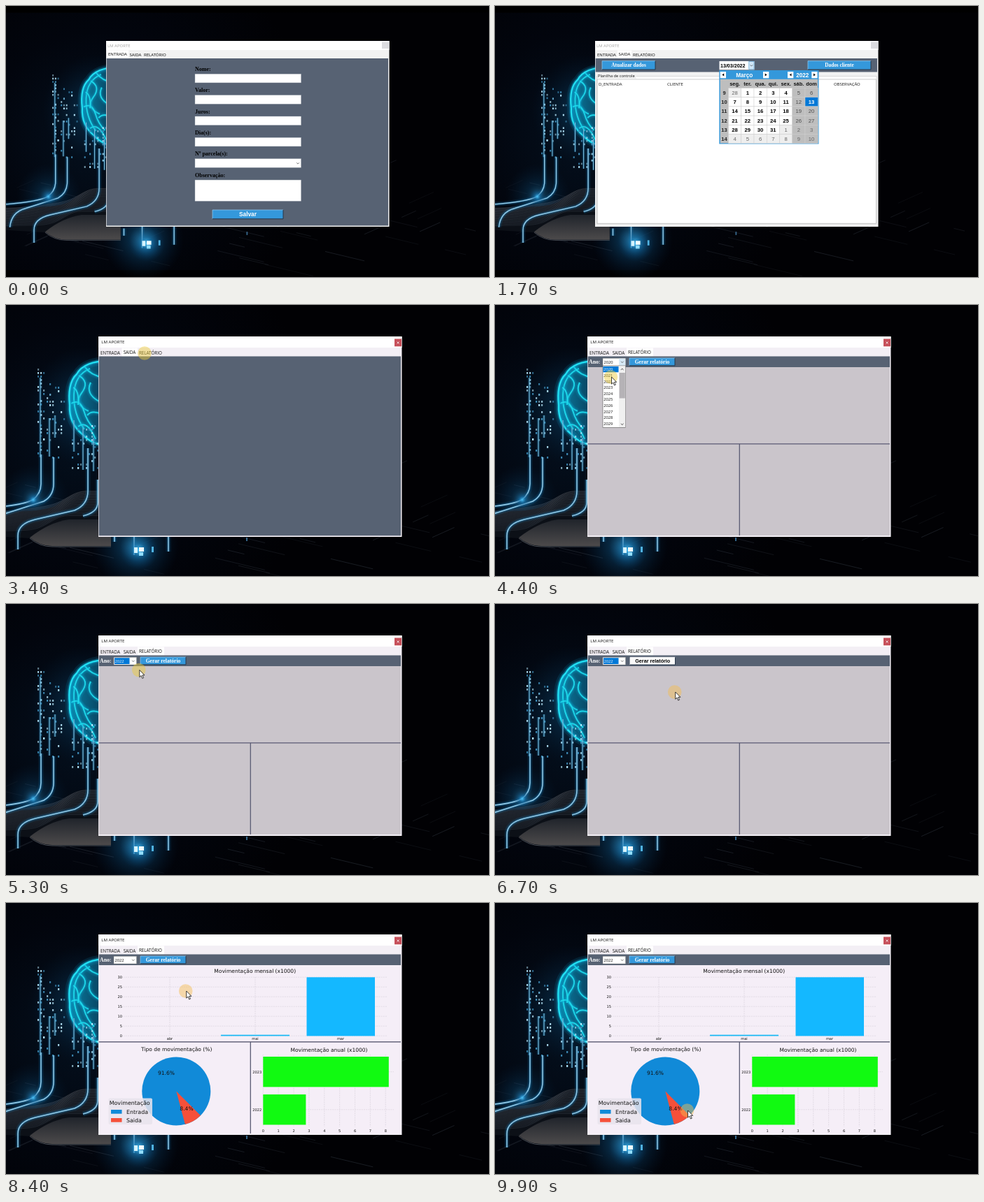
These frames come from a looping animation (690 by 388 pixels, 10000 ms). An HTML page:

```html
<!DOCTYPE html>
<html lang="pt">
<head>
<meta charset="utf-8">
<title>Controle financeiro</title>
<style>
html, body { margin: 0; width: 100%; height: 100%; overflow: hidden; background: #000; }
svg { display: block; width: 100vw; height: 100vh; }
text { white-space: pre; }
.ui { font-family: "Open Sans", "Noto Sans", sans-serif; }
.serif { font-family: "Liberation Serif", serif; font-weight: bold; }
.arial { font-family: "Liberation Sans", sans-serif; }
.bold { font-family: "Liberation Sans", sans-serif; font-weight: bold; }
.plot { font-family: "DejaVu Sans", sans-serif; }
</style>
</head>
<body>
<svg id="stage" viewBox="0 0 690 388" xmlns="http://www.w3.org/2000/svg"></svg>
<script>
const LOOP = 10000, STEP = 100;
const APP = 'LM APORTE';
const BLUE = '#3498db', SLATE = '#576273';

const rect = (x, y, x2, y2, fill, extra = '') =>
  `<rect x="${x}" y="${y}" width="${x2 - x}" height="${y2 - y}" fill="${fill}" ${extra}/>`;
const path = (d, stroke, width = 1, extra = '') =>
  `<path d="${d}" fill="none" stroke="${stroke}" stroke-width="${width}" ${extra}/>`;
const text = (x, y, s, size, cls = 'ui', fill = '#111', anchor = 'start') =>
  `<text x="${x}" y="${y}" font-size="${size}" class="${cls}" fill="${fill}" text-anchor="${anchor}">${s}</text>`;
const mid = (x, y, s, size, cls, fill) => text(x, y, s, size, cls, fill, 'middle');
const group = (id, body, extra = '') => `<g id="${id}" ${extra}>${body}</g>`;
const chevron = (x, y) => path(`M${x - 1.8} ${y - 1}l1.8 1.8l1.8-1.8`, '#555', .8);
const range = (n, fn) => Array.from({ length: n }, (_, i) => fn(i)).join('');
const glow = (x, y, r, o) => `<circle cx="${x}" cy="${y}" r="${r}" fill="url(#glow)" opacity="${o}"/>`;

// A bright line with a soft halo
const neon = (d, color, halo, width) =>
  path(d, halo, width * 5, 'opacity=".13"') + path(d, halo, width * 2.6, 'opacity=".35"') + path(d, color, width);

function randomizer(seed) {
  return () => (seed = (seed * 16807) % 2147483647) / 2147483647;
}

function button(x, y, x2, y2, label, size, cls, hot) {
  return rect(x, y, x2, y2, hot ? '#fafafa' : BLUE) +
    path(`M${x} ${y2}V${y}H${x2}`, hot ? '#fff' : '#8cc6ee', .8) +
    path(`M${x} ${y2}H${x2}V${y}`, '#26374a', 1) +
    mid((x + x2) / 2, (y + y2) / 2 + size * .34, label, size, cls, hot ? '#000' : '#fff');
}

function brain() {
  const shape = 'M145 80C125 80 108 86 101 99C91 108 89 126 91 143C90 162 98 176 109 185C119 196 132 202 150 201Z';
  const folds = [
    'M120 91Q98 100 97 128T112 178', 'M104 101Q120 110 108 126T118 152', 'M93 141Q106 134 111 151T126 177',
    'M112 88Q121 101 140 104', 'M103 174Q116 164 128 192', 'M121 111Q113 127 133 138', 'M96 118Q105 123 103 143',
    'M116 158Q122 150 136 156'
  ];
  return `<path d="${shape}" fill="url(#brain)"/>` + folds.map(d => neon(d, '#1fdcec', '#0fa9d0', 1.7)).join('') +
    neon(shape, '#22dff2', '#0aa6d6', 2.4);
}

function towers(rnd) {
  const dots = (n, x, y, w, h) => range(n, () => {
    const px = x + Math.floor(rnd() * w / 4) * 4, py = y + Math.floor(rnd() * h / 5) * 5;
    return rect(px, py, px + 2.2, py + 2.8, rnd() > .45 ? '#b5e6fa' : '#3f8fbb', `opacity="${.5 + rnd() * .5}"`);
  });
  const bars = [[62, 162, 217], [70, 158, 190], [97, 165, 210], [110, 176, 236], [125, 190, 238], [49, 104, 218]];
  return dots(38, 45, 86, 9, 132) + dots(34, 58, 112, 26, 106) + dots(46, 94, 172, 38, 66) +
    bars.map(([x, a, b]) => neon(`M${x} ${a}V${b}`, '#7fbfdd', '#1877ad', 1.1)).join('');
}

function platform() {
  const ribs = range(16, i => {
    const y = 271 + i * 2.3, x = 108 - i * 1.6;
    return path(`M145 ${y - 4}H${x + 6}C${x - 10} ${y - 4} ${x - 18} ${y + 5} ${x - 34} ${y + 12}S20 ${y + 24 - i * .5} -30 ${y + 26 - i * .5}`,
      '#67727f', .75, `opacity="${.6 - i * .018}"`);
  });
  return '<path d="M150 265H112Q90 270 76 284T-30 296V330L34 334L66 346H150Z" fill="#0c1017"/>' + ribs +
    '<path d="M34 333Q62 311 90 307H150V345H66Q48 345 34 333Z" fill="url(#pad)"/>' +
    path('M34 334Q48 346 66 346H150', '#737980', .9, 'opacity=".7"');
}

function backdrop() {
  const rnd = randomizer(77);
  const floor = range(46, () => {
    const x = rnd() * 720 - 10, y = 248 + rnd() * 136, l = 15 + rnd() * 60;
    const k = rnd() > .4 ? .24 : -.45;
    return path(`M${x} ${y}l${l} ${l * k}`, '#343b46', .7, `opacity="${.25 + rnd() * .45}"`);
  });
  const flows = [
    'M50 214V256Q50 270 38 279Q24 287 -30 291',
    'M68 218V256Q68 273 54 281L4 297Q-18 303 -20 326',
    'M117 205V266Q117 286 98 294L42 307Q17 313 17 330V350',
    'M131 250V283Q131 297 110 302',
    'M183 325V358', 'M232 325V353', 'M155 328V339'
  ];
  return '<rect x="-40" y="-4" width="800" height="396" fill="url(#night)"/>' + floor +
    glow(115, 145, 85, .42) + glow(40, 278, 50, .4) + glow(185, 345, 62, .6) +
    platform() + brain() + towers(rnd) +
    flows.map(d => neon(d, '#93cbe8', '#1d80c0', 1.5)).join('') + glow(39, 279, 13, 1) +
    glow(190, 351, 28, 1) + rect(183, 347, 188, 355, '#d4f4ff') + rect(190, 347, 197, 353, '#f0fdff') +
    rect(190, 354, 196, 359, '#8fdcfb') + rect(208, 346, 211, 354, '#4fb2e2') + rect(343, 333, 345, 338, '#36678b');
}

const defs = `<defs>
<radialGradient id="night" gradientUnits="userSpaceOnUse" cx="110" cy="190" r="330"><stop offset="0" stop-color="#04101e"/><stop offset=".5" stop-color="#02050d"/><stop offset="1" stop-color="#010104"/></radialGradient>
<radialGradient id="glow"><stop offset="0" stop-color="#4cc4fa"/><stop offset=".35" stop-color="#1270ac" stop-opacity=".55"/><stop offset="1" stop-color="#06345c" stop-opacity="0"/></radialGradient>
<linearGradient id="brain"><stop offset="0" stop-color="#0b7fa4"/><stop offset="1" stop-color="#06314c"/></linearGradient>
<linearGradient id="pad" x2="0" y2="1"><stop offset="0" stop-color="#20242b"/><stop offset="1" stop-color="#4c4a4b"/></linearGradient>
</defs>`;

// Small window: form and calendar
function smallFrame(tab) {
  const [a, b] = [[144, 175], [175, 195], [195, 230]][tab];
  const labels = ['ENTRADA', 'SAIDA', 'RELATÓRIO'];
  return rect(143, 50, 547.5, 316, '#f2f2f2') + rect(143, 50, 547.5, 63, '#fff') +
    text(145, 58.5, APP, 6, 'ui', '#a4a4a4') + rect(537, 51.5, 547, 61, '#dcdce0') +
    rect(a, 63.5, b, 75, '#fff') +
    labels.map((s, i) => text([146, 176.5, 197][i], i === tab ? 71.2 : 72.2, s, 6.05, 'ui', '#000')).join('');
}

function form() {
  const rows = ['Nome:', 'Valor:', 'Juros:', 'Dia(s):', 'Nº parcela(s):', 'Observação:'];
  return smallFrame(0) + rect(143.7, 75, 546, 314.5, SLATE) +
    rows.map((s, i) => {
      const y = 97.3 + i * 30.35;
      return text(270, y - 4.4, s, 8, 'serif', '#000') +
        rect(270, y, 421.5, i === 5 ? 279.3 : y + 12.6, '#fff', 'stroke="#a9b0b8" stroke-width=".4"');
    }).join('') + chevron(417, 225.3) +
    button(295, 292, 396, 304.8, 'Salvar', 8.3, 'bold');
}

function calendar() {
  const names = ['seg.', 'ter.', 'qua.', 'qui.', 'sex.', 'sáb.', 'dom'];
  const left = 333.5, top = 117.5, cw = 18.25, ch = 13.2;
  const arrow = (x, dir) => rect(x, 94, x + 8.3, 103.3, '#fff') +
    `<path d="M${x + 4.1 - dir * 1.4} 96.6l${dir * 2.8} 2l${-dir * 2.8} 2z" fill="#000"/>`;
  let s = rect(320.3, 92, 462.5, 197.5, BLUE) + rect(321.7, 104.8, 461.2, 196.4, '#bebebe') +
    arrow(321.7, -1) + arrow(383, 1) + arrow(418, -1) + arrow(452.3, 1) +
    mid(356.3, 101.5, 'Março', 8.2, 'bold', '#fff') + mid(439.3, 101.5, '2022', 8.2, 'bold', '#fff');
  names.forEach((name, i) => s += mid(left + cw * (i + .5), 114.3, name, 7.4, 'bold', '#111'));
  for (let r = 0; r < 6; r++) {
    const y = top + r * ch;
    s += mid(327.5, y + 9.4, 9 + r, 7.5, 'bold', '#222');
    for (let c = 0; c < 7; c++) {
      const n = r * 7 + c, day = n < 1 ? 28 : n > 31 ? n - 31 : n;
      const other = n < 1 || n > 31, weekend = c > 4, chosen = n === 13;
      const fill = chosen ? '#0078d7' : weekend ? '#bebebe' : other ? '#eeeeee' : '#fff';
      const ink = chosen ? '#fff' : other ? '#666' : weekend ? '#4d4d4d' : '#000';
      const x = left + c * cw;
      s += rect(x, y, x + cw, y + ch, fill, 'stroke="#d0d0d0" stroke-width=".5"') +
        mid(x + cw / 2, y + 9.4, day, 7.7, chosen || !(weekend || other) ? 'bold' : 'arial', ink);
    }
  }
  return s;
}

function sheet() {
  return smallFrame(1) + rect(143.7, 75, 546, 94.5, SLATE) +
    button(153, 78.7, 229, 91, 'Atualizar dados', 7.3, 'serif') +
    button(447, 78.7, 537, 91, 'Dados cliente', 7.3, 'serif') +
    rect(145.5, 100.5, 545, 312, '#fff', 'stroke="#d2d2d2" stroke-width=".8"') +
    rect(146, 97, 202, 104, '#f2f2f2') + text(147, 102.2, 'Planilha de controle', 5.7) +
    rect(146, 105, 544.5, 311.2, '#fff', 'stroke="#aaa" stroke-width=".6"') +
    text(148, 113.7, 'D_ENTRADA', 5.95) + text(246, 113.7, 'CLIENTE', 5.95) + text(484, 113.7, 'OBSERVAÇÃO', 5.95) +
    rect(320.5, 79, 370.5, 91.3, '#fff') + text(322, 87.8, '13/03/2022', 7.1, 'bold', '#000') +
    rect(362.8, 79.5, 370, 90.8, '#cfe6f7', 'stroke="#4a9bd4" stroke-width=".6"') + chevron(366.4, 85.3) +
    calendar();
}

// Large window: report
function largeFrame() {
  return rect(132, 45, 565.5, 332, '#f3eff5') + rect(132, 45, 565.5, 61, '#fff') +
    text(136.3, 55.2, APP, 6.1) + rect(555, 48.5, 565, 59.3, '#c6505a') +
    path('M558.7 52.6l2.8 2.8m0-2.8l-2.8 2.8', '#fff', .8);
}

function largeTabs(tab) {
  const [a, b] = tab === 1 ? [165.5, 188] : [188, 226];
  return rect(a, 61.5, b, 74, '#fff') +
    ['ENTRADA', 'SAIDA', 'RELATÓRIO'].map((s, i) => text([135, 167.7, 190][i], i === tab ? 69.8 : 70.8, s, 6.25)).join('');
}

function yearList() {
  return rect(154, 87, 186.5, 175.3, '#fff', 'stroke="#555" stroke-width=".6"') +
    rect(154.4, 88, 176.5, 96.3, '#0078d7', 'id="pick"') +
    range(10, i => `<text class="ui year" x="155.3" y="${94.2 + i * 8.65}" font-size="5.7">${2020 + i}</text>`) +
    rect(177, 87.4, 186.2, 175, '#f0f0f0') + rect(177.6, 97, 185.8, 133.5, '#b5b2b6') +
    path('M179.9 92.9l1.8-1.8l1.8 1.8M179.9 169.8l1.8 1.8l1.8-1.8', '#444', 1);
}

const PANEL = '#f5eef7', DASH = 'stroke-dasharray="2 1.2"', GRID = '#d5cfd8';

function monthly() {
  const ticks = range(7, i => {
    const y = 190.2 - i * 14;
    return path(`M167.5 ${y}H545`, GRID, .6, DASH) + text(166, y + 1.9, i * 5, 5.1, 'plot', '#111', 'end');
  });
  return rect(132.7, 89, 564, 198, PANEL) + mid(355.7, 99.8, 'Movimentação mensal (x1000)', 7.53, 'plot') + ticks +
    ['abr', 'mai', 'mar'].map((s, i) => path(`M${234 + i * 122} 106V190`, GRID, .6, DASH) + mid(234 + i * 122, 196, s, 5.1, 'plot')).join('') +
    rect(307, 188.7, 405, 190.4, '#16b8f5') + rect(429.5, 106.3, 527, 190.4, '#14b8ff');
}

function pie() {
  const cx = 243.3, cy = 269.5, r = 49;
  const at = deg => `${cx + r * Math.cos(deg * Math.PI / 180)} ${cy + r * Math.sin(deg * Math.PI / 180)}`;
  const key = (y, fill, s) => rect(150, y - 3, 165.5, y + 2.7, fill) + text(172, y + 2.8, s, 7.9, 'plot');
  return rect(132.7, 199.5, 349, 330, PANEL) + mid(243.7, 212.2, 'Tipo de movimentação (%)', 7.5, 'plot') +
    `<circle cx="${cx}" cy="${cy}" r="${r}" fill="#118ad8"/>` +
    `<path d="M${cx} ${cy}L${at(45)}A${r} ${r} 0 0 1 ${at(75.2)}Z" fill="#f6503a"/>` +
    mid(229, 246, '91.6%', 7.6, 'plot') + mid(258, 296.6, '8.4%', 7.6, 'plot') +
    rect(146.5, 279.5, 209, 317, '#e9e4ed', 'rx="2" opacity=".85"') +
    mid(176.7, 289.2, 'Movimentação', 7.9, 'plot') + key(299, '#118ad8', 'Entrada') + key(311, '#f6503a', 'Saida');
}

function yearly() {
  const ticks = range(9, i => {
    const x = 367.3 + i * 21.87;
    return path(`M${x} 217V320`, GRID, .6, DASH) + mid(x, 327.6, i, 5.1, 'plot');
  });
  const row = (y, x2, s) => path(`M367 ${y}H554`, GRID, .6, DASH) +
    rect(367.3, y - 21.7, x2, y + 21.7, '#11fa11') + text(365.3, y + 2, s, 5.1, 'plot', '#111', 'end');
  return rect(350, 199.5, 564, 330, PANEL) + mid(461.5, 212.6, 'Movimentação anual (x1000)', 7.5, 'plot') +
    ticks + row(241.7, 546.8, '2023') + row(295.8, 428.4, '2022');
}

function report() {
  return largeTabs(2) + rect(132.7, 73.5, 564, 89, SLATE) + text(134, 83.8, 'Ano:', 7.8, 'serif', '#fff') +
    rect(154, 76.2, 186.5, 87, '#fff', 'stroke="#888" stroke-width=".5"') +
    rect(155, 77.2, 176.5, 86, '#0078d7', 'id="mark"') +
    '<text id="year" class="ui" x="155.5" y="84" font-size="5.7"></text>' +
    rect(177.2, 76.7, 186.2, 86.6, '#d7e9f6', 'id="drop"') + chevron(181.8, 81.8) +
    group('cool', button(192, 76, 257, 86.8, 'Gerar relatório', 7.6, 'serif')) +
    group('hot', button(193, 76.3, 257.5, 87, 'Gerar relatório', 7.2, 'bold', true)) +
    rect(132.7, 89, 564, 330, '#cac5cb') +
    group('blank', rect(132.7, 89, 564, 198, '#fff') + rect(349.5, 199, 564, 330, '#fff')) +
    group('charts', monthly() + pie() + yearly()) +
    path('M132.7 198.8H564M349.3 198.8V330', '#5b5b74', 1.3) +
    group('list', yearList());
}

const stage = document.getElementById('stage');
stage.innerHTML = defs + rect(0, 0, 690, 388, '#000') +
  group('back', backdrop()) + group('form', form()) + group('sheet', sheet()) +
  group('large', largeFrame() + group('empty', largeTabs(1) + rect(132.7, 73.5, 564, 330.3, SLATE)) + group('report', report())) +
  group('pointer', '<circle id="halo" r="9.8" opacity=".47"/>' +
    '<path id="arrow" d="M1 0V10.2L3.3 8L5 12L6.8 11.2L5 7.4H8.2Z" fill="#fff" stroke="#111" stroke-width=".8"/>');

const $ = id => document.getElementById(id);
const show = (id, on) => $(id).setAttribute('display', on ? 'inline' : 'none');
const years = [...document.querySelectorAll('.year')];

// time, x, y
const track = [
  [3400, 198, 69], [3700, 200, 69], [4000, 183, 81], [4200, 183, 81], [4400, 165.5, 103], [4700, 165.5, 109],
  [5100, 165.5, 109], [5500, 214, 80], [6200, 214, 80], [6500, 240, 93], [6600, 240, 93], [6700, 256.7, 126],
  [9400, 256.7, 126], [9500, 239, 150], [9600, 230, 190], [9700, 237, 233], [9800, 258, 272], [9900, 274.5, 297]
];

function pointerAt(t) {
  const i = track.findIndex(k => k[0] > t);
  if (i < 1) return track[i < 0 ? track.length - 1 : 0].slice(1);
  const [a, b] = [track[i - 1], track[i]], u = (t - a[0]) / (b[0] - a[0]);
  return [1, 2].map(j => a[j] + (b[j] - a[j]) * u);
}

function render(t) {
  const large = t >= 3400;
  $('back').setAttribute('transform', large ? '' : 'translate(24.2 13.3) scale(.9307)');
  show('form', t < 1700);
  show('sheet', t >= 1700 && !large);
  show('large', large);
  show('pointer', large);
  if (!large) return;

  show('empty', t < 3700);
  show('report', t >= 3700);
  show('arrow', t >= 3700);
  show('list', t >= 4200 && t < 5100);
  const pick = t < 4600 ? 0 : t < 4700 ? 1 : 2;
  $('pick').setAttribute('y', 88 + pick * 8.65);
  years.forEach((el, i) => el.setAttribute('fill', i === pick ? '#fff' : '#111'));

  const marked = t >= 5100 && t < 8200;
  show('mark', marked);
  $('year').textContent = t < 4200 ? '' : t < 5100 ? '2020' : '2022';
  $('year').setAttribute('fill', marked ? '#fff' : '#111');
  show('drop', t >= 4000 && t < 5200);
  const hot = t >= 5400 && t < 7900;
  show('hot', hot);
  show('cool', !hot);
  show('blank', t >= 8000 && t < 8100);
  show('charts', t >= 8100);
  $('halo').setAttribute('fill', t < 5400 ? '#eccb3c' : '#f5be50');
  $('pointer').setAttribute('transform', `translate(${pointerAt(t).join(' ')})`);
}

function tick() {
  render(Math.floor(performance.now() % LOOP / STEP) * STEP);
  requestAnimationFrame(tick);
}
tick();
</script>
</body>
</html>
```
